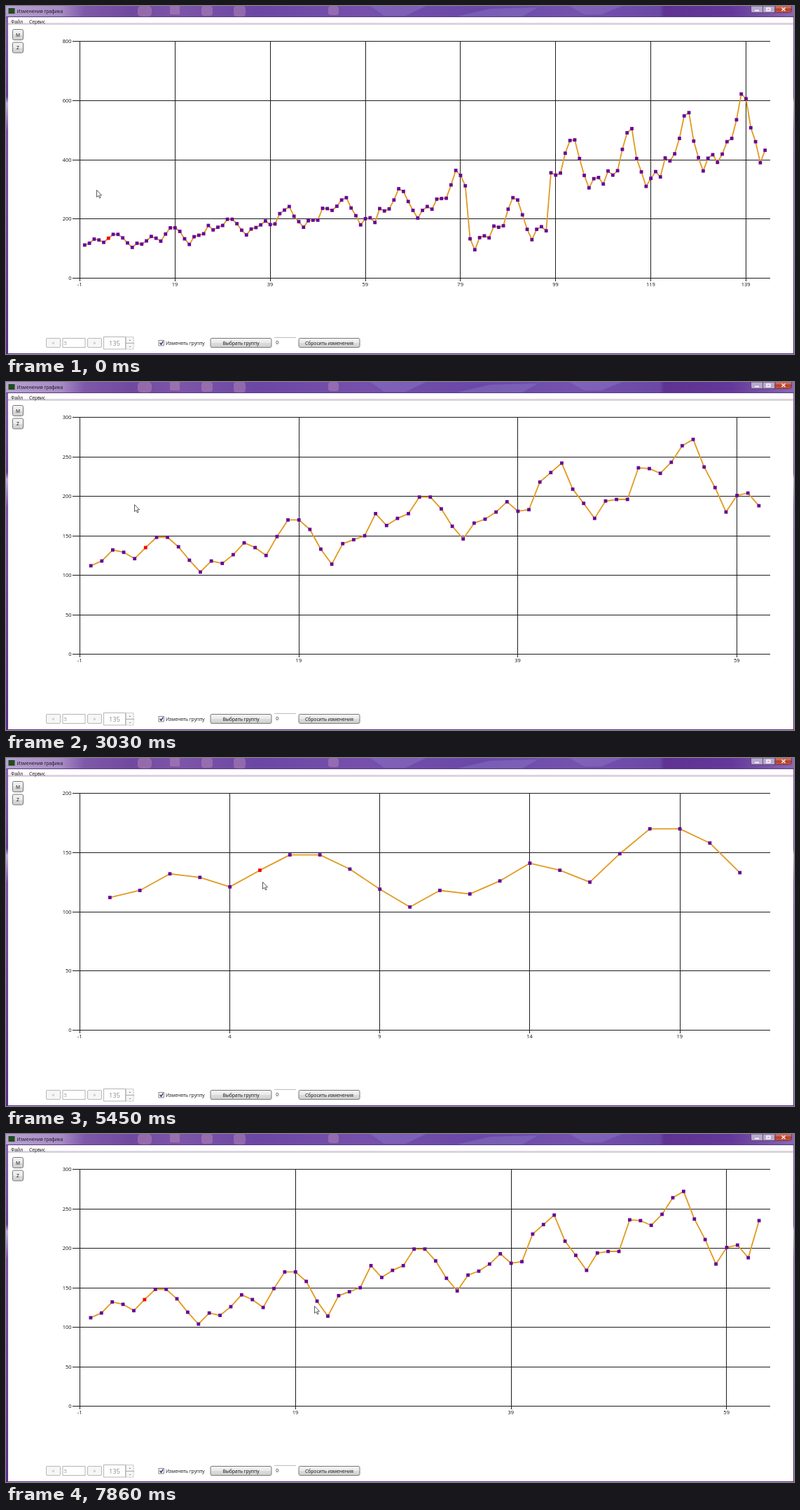
An HTML page that plays this animation: 1125x498 px, repeating every 8000 ms.

```html
<!DOCTYPE html>
<html lang="ru">
<head>
<meta charset="utf-8">
<title>Изменения графика</title>
<style>
html, body { margin: 0; width: 100%; height: 100%; overflow: hidden; background: #fff; }
svg { display: block; width: 1125px; height: 498px; }
text { font: 6.7px "Open Sans", "Noto Sans", sans-serif; fill: #111; }
.mid { text-anchor: middle; }
#chart text { font-size: 7.5px; }
#chart .grid { stroke: #1c1c1c; fill: none; }
#chart .end { text-anchor: end; }
.btn { fill: url(#face); stroke: #777; }
.off { fill: #f6f6f6; stroke: #b8b8b8; }
.field { fill: #fff; stroke: #b4b4b4; }
.dim { fill: #8a8a8a; }
</style>
</head>
<body>
<svg viewBox="0 0 1125 498">
  <defs>
    <linearGradient id="glass">
      <stop offset="0" stop-color="#b8a0d0"/><stop offset=".07" stop-color="#a78bc6"/>
      <stop offset=".1" stop-color="#7e58a8"/><stop offset=".16" stop-color="#7148a0"/>
      <stop offset=".22" stop-color="#7d55a8"/><stop offset=".32" stop-color="#6b46a4"/>
      <stop offset=".45" stop-color="#7650ac"/><stop offset=".6" stop-color="#6a48a8"/>
      <stop offset=".72" stop-color="#7452ae"/><stop offset=".83" stop-color="#6c48a6"/>
      <stop offset=".835" stop-color="#5e3192"/><stop offset=".92" stop-color="#64389a"/>
      <stop offset="1" stop-color="#8a68b4"/>
    </linearGradient>
    <linearGradient id="side" x2="0" y2="1">
      <stop offset="0" stop-color="#8a68b4"/><stop offset=".26" stop-color="#6a3f98"/>
      <stop offset=".28" stop-color="#c4b0d8"/><stop offset=".36" stop-color="#7d52a8"/>
      <stop offset="1" stop-color="#5b2d88"/>
    </linearGradient>
    <linearGradient id="face" x2="0" y2="1">
      <stop offset="0" stop-color="#f3f3f3"/><stop offset=".5" stop-color="#ebebeb"/>
      <stop offset=".5" stop-color="#dddddd"/><stop offset="1" stop-color="#cfcfcf"/>
    </linearGradient>
    <linearGradient id="red" x2="0" y2="1">
      <stop offset="0" stop-color="#dc9484"/><stop offset=".5" stop-color="#bd3a26"/>
      <stop offset="1" stop-color="#c85a40"/>
    </linearGradient>
  </defs>

  <!-- window frame -->
  <rect width="1125" height="498" fill="url(#side)"/>
  <rect width="1125" height="16" fill="url(#glass)"/>
  <g fill="#c79abc" opacity=".4">
    <rect x="188" width="20" height="15" rx="5"/><rect x="234" width="14" height="12"/>
    <rect x="279" width="16" height="14" rx="4"/><rect x="325" width="17" height="15" rx="4"/>
    <rect x="460" width="15" height="13" rx="4"/>
  </g>
  <g fill="#8f7cc8" opacity=".4">
    <path d="M520 0H600L570 14H540ZM640 16L690 4L760 2L735 16ZM805 0H880L850 12H825Z"/>
  </g>
  <path d="M0 15.5H1125" stroke="#5c3d80"/>
  <rect x="3" y="16" width="1121" height="481" fill="#fff"/>
  <rect x="3" y="24" width="1121" height="3" fill="#ddd2dd"/>
  <rect x="3.5" y="3" width="9" height="8" fill="#1f4d22"/>
  <text x="15.5" y="10.2">Изменения графика</text>
  <text x="7" y="25.4">Файл</text>
  <text x="33" y="25.4">Сервис</text>
  <g stroke="#4a3a60" stroke-width=".8">
    <path d="M1063.5 0V7Q1063.5 9.5 1066 9.5H1098V0Z" fill="#b9a8cf"/>
    <path d="M1080.5 0V9.5"/>
    <path d="M1098 0V9.5H1119Q1121.5 9.5 1121.5 7V0Z" fill="url(#red)"/>
  </g>
  <g fill="none" stroke="#fff" stroke-width="1.4">
    <path d="M1069 6.5H1075M1086 3H1091V6.5H1086ZM1107.5 2.5L1112.5 7M1112.5 2.5L1107.5 7"/>
  </g>

  <!-- tool buttons -->
  <rect class="btn" x="9.5" y="33.5" width="15" height="15" rx="2"/>
  <rect class="btn" x="9.5" y="52" width="15" height="15" rx="2"/>
  <text class="mid" x="17" y="43.6">M</text>
  <text class="mid" x="17" y="62.1">Z</text>

  <!-- bottom bar -->
  <rect class="off" x="57.5" y="475.5" width="20" height="13" rx="1.5"/>
  <text class="mid dim" x="67.5" y="484.6">&lt;</text>
  <rect class="field" x="81" y="475.5" width="32" height="13"/>
  <text class="dim" x="83" y="484.6">5</text>
  <rect class="off" x="116.5" y="475.5" width="20" height="13" rx="1.5"/>
  <text class="mid dim" x="126.5" y="484.6">&gt;</text>
  <rect class="field" x="139.5" y="473.5" width="31" height="17.5"/>
  <text class="mid dim" x="155" y="486" style="font-size:9.2px">135</text>
  <rect class="off" x="171.5" y="473.5" width="10.5" height="17.5" style="stroke:#d0d0d0"/>
  <path d="M171 482.5H183" stroke="#aaa"/>
  <path d="M176 478.5H178M176 487.5H178" stroke="#888"/>
  <rect x="218" y="478.5" width="7.5" height="7.5" fill="#f8f8f8" stroke="#8a8a8a"/>
  <path d="M219.7 481.8L221.4 484.3L224.2 479.8" fill="none" stroke="#1d2068" stroke-width="1.3"/>
  <text x="228" y="484.6">Изменять группу</text>
  <rect class="btn" x="292" y="475.5" width="87" height="13" rx="2"/>
  <text class="mid" x="335.5" y="484.6">Выбрать группу</text>
  <path d="M383 474.5H414" stroke="#bbb"/>
  <text x="385.3" y="484.4">0</text>
  <rect class="btn" x="418" y="475.5" width="87" height="13" rx="2"/>
  <text class="mid" x="461.5" y="484.6">Сбросить изменения</text>

  <g id="chart"></g>
  <path id="mouse" d="M0 0V10L2.4 7.9L4 11.5L5.5 10.9L4 7.3H7Z" fill="#fff" stroke="#333" stroke-width=".8"/>
</svg>
<script>
const data = [
  112, 118, 132, 129, 121, 135, 148, 148, 136, 119, 104, 118,
  115, 126, 141, 135, 125, 149, 170, 170, 158, 133, 114, 140,
  145, 150, 178, 163, 172, 178, 199, 199, 184, 162, 146, 166,
  171, 180, 193, 181, 183, 218, 230, 242, 209, 191, 172, 194,
  196, 196, 236, 235, 229, 243, 264, 272, 237, 211, 180, 201,
  204, 188, 235, 227, 234, 264, 302, 293, 259, 229, 203, 229,
  242, 233, 267, 269, 270, 315, 364, 347, 312, 133, 96, 137,
  143, 136, 176, 172, 177, 233, 272, 264, 214, 165, 130, 165,
  174, 160, 356, 348, 355, 422, 465, 467, 404, 347, 305, 336,
  340, 318, 362, 348, 363, 435, 491, 505, 404, 359, 310, 337,
  360, 342, 406, 396, 420, 472, 548, 559, 463, 407, 362, 405,
  417, 391, 419, 461, 472, 535, 622, 606, 508, 461, 390, 432
];
const LOOP = 8000, LEFT = 105.5, RIGHT = 1090.5, TOP = 50.5, BASE = 389.5, SELECTED = 5;

// moments at which the picture is refreshed
const ticks = [
  0, 140, 360, 590, 810, 1060, 1280, 1440, 1630, 1840, 1990, 2130, 2260,
  2380, 2600, 2820, 3030, 3240, 3440, 3620, 3810, 4090, 4250, 4410, 4570, 4750, 4860, 4980,
  5150, 5300, 5450, 5600, 5770, 5940, 6130, 6310, 6510, 6720, 6930, 7140, 7700, 7860
];
// time, last visible point, pointer x, pointer y
const keys = [
  [0, 143, 129, 263], [810, 117, 134, 135], [1840, 97, 192, 224],
  [3030, 61, 183, 175], [4570, 25, 211, 172], [4980, 15, 283, 174],
  [5940, 27, 452, 180], [7140, 62, 455, 214], [7860, 62, 440, 246]
];

const chart = document.getElementById("chart");
const mouse = document.getElementById("mouse");

function stateAt(t) {
  const i = Math.max(1, keys.findIndex(k => k[0] >= t));
  const a = keys[i - 1], b = keys[i];
  const f = (t - a[0]) / (b[0] - a[0]);
  return [1, 2, 3].map(j => Math.round(a[j] + (b[j] - a[j]) * f));
}

// axis interval: 2, 5 or 10 times a power of ten
function interval(span) {
  const step = span / 5;
  const power = 10 ** (Math.ceil(Math.log10(step)) - 1);
  const m = step / power;
  return (m < 3 ? 2 : m < 7 ? 5 : 10) * power;
}

const snap = v => Math.floor(v) + 0.5;

function drawChart(last) {
  const shown = data.slice(0, last + 1);
  const peak = Math.max(...shown);
  const stepX = interval(last + 2), stepY = interval(peak);
  const maxY = Math.ceil(peak / stepY) * stepY;
  const px = i => LEFT + (i + 1) / (last + 2) * (RIGHT - LEFT);
  const py = v => BASE - v / maxY * (BASE - TOP);
  let grid = "", labels = "", marks = "";

  for (let v = 0; v <= maxY; v += stepY) {
    grid += `M95 ${snap(py(v))}H1091`;
    labels += `<text class="end" x="93.5" y="${py(v) + 2.7}">${v}</text>`;
  }
  for (let i = -1; i <= last + 1; i += stepX) {
    grid += `M${snap(px(i))} ${TOP}V394`;
    labels += `<text class="mid" x="${px(i) - 0.3}" y="401">${i}</text>`;
  }
  shown.forEach((v, i) => {
    const color = i === SELECTED ? "#f00808" : "#66089a";
    marks += `<rect x="${px(i) - 2.4}" y="${py(v) - 2.4}" width="4.8" height="4.8" fill="${color}"/>`;
  });
  const points = shown.map((v, i) => `${px(i)},${py(v)}`).join(" ");
  chart.innerHTML = `<path class="grid" d="${grid}"/>${labels}` +
    `<polyline points="${points}" fill="none" stroke="#e09a20" stroke-width="1.8" stroke-linejoin="round"/>${marks}`;
}

let drawn = -1;
function frame() {
  const t = performance.now() % LOOP;
  const tick = ticks.filter(v => v <= t).pop();
  if (tick !== drawn) {
    const [last, x, y] = stateAt(tick);
    drawChart(last);
    mouse.setAttribute("transform", `translate(${x + 0.5} ${y + 0.5})`);
    drawn = tick;
  }
  requestAnimationFrame(frame);
}
frame();
</script>
</body>
</html>
```
